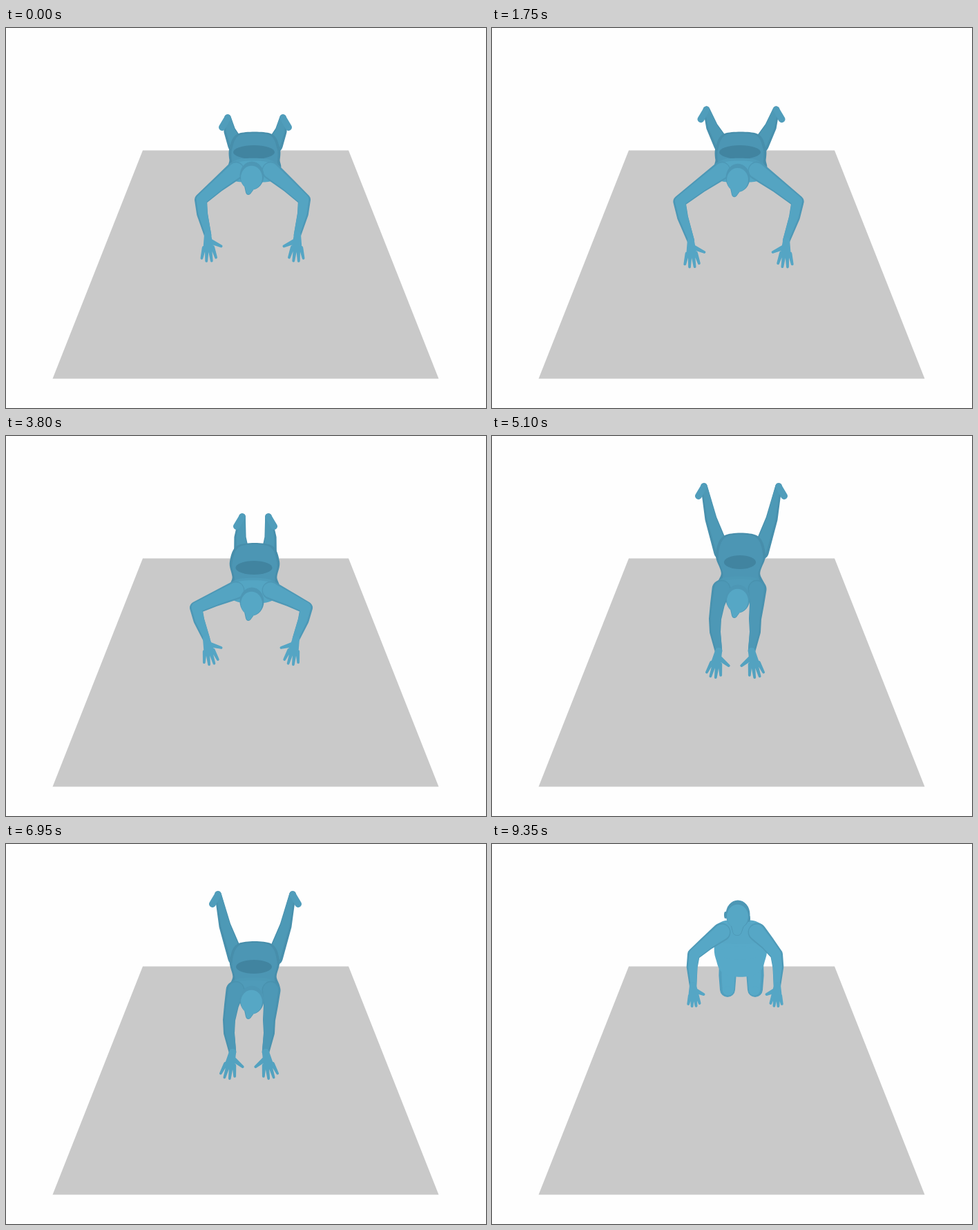
These frames come from a looping animation (695x551 px, 9400 ms). An HTML page:

```html
<!DOCTYPE html>
<html lang="en">
<head>
<meta charset="utf-8">
<title>Floor exercise</title>
<style>
html, body { margin: 0; width: 100%; height: 100%; overflow: hidden; background: #fefefe; }
svg { display: block; width: 100%; height: 100%; }
</style>
</head>
<body>
<svg viewBox="0 0 695 551">
  <path d="M198 177.5H496L626.5 508.5H67.5Z" fill="#c9c9c9"/>
  <g id="body"></g>
</svg>
<script>
const LOOP = 9400, STEP = 50, CYCLE = 1850, REPS = 5;
const group = document.getElementById('body');

// Each x is a distance from the middle of the body, so a pose holds for both sides.
// turn: hand angle inward; lean: sideways shift of the arms; dim: shade of the arms.
const open = {
  footX: 40, footY: 130, hipY: 153, shoulderY: 207, headY: 214,
  elbowX: 75, elbowY: 249, handX: 65, handY: 300,
  turn: 3, lean: 0, dim: .25, shade: 1
};
const wide = { ...open, footX: 56, footY: 98, headY: 225, elbowX: 98, elbowY: 258, handX: 74, handY: 318 };
const lowering = {
  ...open, footX: 19, footY: 117, hipY: 158, shoulderY: 224, headY: 240,
  elbowX: 80, handY: 294, turn: 12, lean: -2
};
const fold = {
  ...open, footX: 15, footY: 152, hipY: 161, shoulderY: 209, headY: 207,
  elbowX: 67, elbowY: 244, handX: 17, handY: 249, turn: 85, lean: 4, dim: .15
};
const tuck = {
  ...fold, footX: 14, footY: 137, hipY: 153, shoulderY: 199, headY: 186,
  elbowX: 53, elbowY: 243, handX: 18, handY: 239, turn: 94, lean: 2
};
const stretch = {
  ...open, footX: 54, footY: 73, hipY: 144, shoulderY: 222, headY: 236,
  elbowX: 29, elbowY: 265, handX: 24, handY: 312, turn: -12, lean: -5, dim: .8
};
const kneel = {
  ...open, footX: 20, footY: 211, hipY: 188, shoulderY: 128, headY: 102,
  elbowX: 60, elbowY: 160, handX: 61, handY: 205, lean: -5, dim: .1, shade: 0
};
const rise = { ...kneel, elbowX: 85, elbowY: 195, handX: 70, handY: 240, shade: .4 };

function raise(p, up) {
  const q = { ...p };
  for (const k of ['shoulderY', 'headY', 'elbowY', 'handY']) q[k] -= up;
  return q;
}

// The same push-up repeats; the last one ends kneeling.
const keys = [];
for (let n = 0; n < REPS; n++) {
  const t = n * CYCLE;
  keys.push([t, open], [t + 100, lowering], [t + 650, fold], [t + 1050, tuck],
    [t + 1400, raise(stretch, 10 * (n - 2))], [t + 1640, wide]);
}
keys.splice(keys.findIndex(k => k[0] > 8500), Infinity, [8850, rise], [9350, kneel]);

const lerp = (a, b, k) => a + (b - a) * k;
const slope = (a, b, f) => (b[1][f] - a[1][f]) / (b[0] - a[0]);

// Monotone tangent: flow through keys without overshoot.
function tangent(i, f) {
  if (!i || i === keys.length - 1) return 0;
  const a = slope(keys[i - 1], keys[i], f), b = slope(keys[i], keys[i + 1], f);
  return a * b > 0 ? 2 * a * b / (a + b) : 0;
}

function poseAt(t) {
  let i = 0;
  while (i < keys.length - 2 && t >= keys[i + 1][0]) i++;
  const [t0, p] = keys[i], [t1, q] = keys[i + 1], out = {};
  const h = t1 - t0, u = Math.min(1, (t - t0) / h), v = 1 - u;
  for (const f in p) {
    out[f] = p[f] * (1 + 2 * u) * v * v + q[f] * u * u * (3 - 2 * u) +
      h * u * v * (tangent(i, f) * v - tangent(i + 1, f) * u);
  }
  return out;
}

const LIGHT = [87, 169, 200], DARK = [64, 130, 158];
const tone = k => `rgb(${LIGHT.map((c, i) => Math.round(lerp(c, DARK[i], k)))})`;
const num = n => n.toFixed(2);

const pool = [];
let used = 0;
function draw(d, fill) {
  if (!pool[used]) {
    pool[used] = document.createElementNS('http://www.w3.org/2000/svg', 'path');
    group.append(pool[used]);
  }
  pool[used].setAttribute('d', d);
  pool[used++].setAttribute('fill', fill);
}

function oval(x, y, rx, ry) {
  const arc = `A${num(rx)} ${num(ry)} 0 1 1 `;
  return `M${num(x - rx)} ${num(y)}${arc}${num(x + rx)} ${num(y)}${arc}${num(x - rx)} ${num(y)}Z`;
}

// Outline around two circles, used for every limb segment.
function bone([x, y], r, [x2, y2], r2) {
  const d = Math.hypot(x2 - x, y2 - y);
  if (d <= Math.abs(r - r2) + .01) return r > r2 ? oval(x, y, r, r) : oval(x2, y2, r2, r2);
  const a = Math.atan2(y2 - y, x2 - x), o = Math.acos((r - r2) / d);
  const at = (cx, cy, cr, w) => `${num(cx + cr * Math.cos(w))} ${num(cy + cr * Math.sin(w))}`;
  const big = o < Math.PI / 2 ? 1 : 0;
  return `M${at(x, y, r, a + o)}A${num(r)} ${num(r)} 0 ${big} 1 ${at(x, y, r, a - o)}` +
    `L${at(x2, y2, r2, a - o)}A${num(r2)} ${num(r2)} 0 ${1 - big} 1 ${at(x2, y2, r2, a + o)}Z`;
}

const chain = (pts, radii, k = 1) =>
  pts.slice(1).map((p, i) => bone(pts[i], radii[i] * k, p, radii[i + 1] * k)).join('');

// Closed curve, mirrored about x, through [half width, y] points.
function mirrored(x, half) {
  const pts = [...half.map(([w, y]) => [x - w, y]), ...half.map(([w, y]) => [x + w, y]).reverse()];
  const n = pts.length, at = i => pts[(i + n) % n];
  let d = `M${pts[0].map(num)}`;
  for (let i = 0; i < n; i++) {
    const [a, b, c, e] = [at(i - 1), at(i), at(i + 1), at(i + 2)];
    const c1 = b.map((v, k) => num(v + (c[k] - a[k]) / 6));
    const c2 = c.map((v, k) => num(v - (e[k] - b[k]) / 6));
    d += `C${c1} ${c2} ${c.map(num)}`;
  }
  return d + 'Z';
}

function hand(wrist, degrees, len, side) {
  const to = (turn, k) => {
    const a = (degrees * Math.PI / 180 + turn) * side;
    return [wrist[0] + Math.sin(a) * len * k, wrist[1] + Math.cos(a) * len * k];
  };
  let d = bone(wrist, 5, to(0, .4), 7);
  for (let i = -1.5; i < 2; i++) {
    d += bone(to(i * .22, .5), 2.9, to(i * .2, .99 - .04 * i * i), 1.9);
  }
  return d + bone(to(.3, .25), 3.8, to(.82, .66), 1.9);
}

function leg(p, side) {
  const at = (x, y) => [361 - side * x, y];
  const knee = 1 - p.shade;
  const hip = Math.min(p.footX, 28), hipY = lerp(p.hipY, p.shoulderY, .3);
  const joints = [
    at(p.footX, p.footY),
    at((p.footX + hip) / 2 + 3 * p.shade, (p.footY + hipY) / 2),
    at(hip, hipY)
  ];
  const radii = [4.8 + 6.2 * knee, 8.6 + 4 * knee, 12];
  draw(chain(joints, radii), tone(.25 + .4 * p.shade));
  draw(chain(joints.map(([x, y]) => [x + side, y]), radii, .76), tone(.42 * p.shade));
  const heel = at(p.footX + 8 * p.shade, p.footY + 14 * p.shade);
  draw(bone(heel, 5, joints[0], 4.6), tone(.3 * p.shade));
}

function torso(p, bend) {
  const down = k => lerp(p.hipY, p.shoulderY, k);
  const waist = 38 - .35 * Math.max(0, p.shoulderY - p.hipY - 50);
  const rows = [[23, down(0)], [36, down(.36)], [waist, down(.7)], [32, down(1)]];
  draw(mirrored(360, rows), tone(.7 * p.shade));
  draw(mirrored(360, rows.map(([w, y]) => [w * .9, y + 2])), tone(.48 * p.shade));
  draw(oval(359, down(.5), waist * .82, 10), tone(.95 * p.shade));

  const y = p.shoulderY;
  const chest = [[20, y - 17], [36, y - 6], [34, y + 6], [20, y + 12 + 14 * bend]];
  draw(mirrored(358, chest), tone(.3 * p.shade + .15 * p.dim));
  draw(mirrored(358, chest.map(([w, v]) => [w * .95, v + 4 - bend * 3])), tone(.45 * p.dim));
}

function arm(p, side, bend) {
  const at = (x, y, lean = p.lean) => [357 + lean - side * x, y];
  const shoulder = at(26, p.shoulderY, 1), elbow = at(p.elbowX, p.elbowY), wrist = at(p.handX, p.handY);
  const between = (a, b, k, out) => [lerp(a[0], b[0], k) - side * out, lerp(a[1], b[1], k)];
  const joints = [
    shoulder, between(shoulder, elbow, .5, 1 + bend), elbow,
    between(elbow, wrist, .4, 2 - 2 * bend), wrist
  ];
  const radii = [13.5, 10.5 + 2 * bend, 9, 8, 5.2];
  draw(chain(joints, radii), tone(.35 + .3 * p.dim));
  draw(chain(joints.map(([x, y]) => [x + side, y - .5]), radii, .82), tone(.55 * p.dim));
  const len = lerp(31, 39, p.shade) * (1 - .15 * bend);
  draw(hand(wrist, p.turn, len, side), tone(.06 + .15 * p.dim));
}

function head(p) {
  const x = 356, y = p.headY, chin = [x - 4 * p.shade - 1, y + 24], jaw = 7 - 3 * p.shade;
  const ear = 1 - p.shade;
  if (ear > .1) draw(oval(x - 18, y + 1, 2 * ear, 5) + oval(x + 16, y + 6, 2 * ear, 5), tone(.5));
  draw(oval(x, y, 17.5, 20.5) + bone([x, y], 14, chin, jaw), tone(.45));
  draw(oval(x - .5, y + 3, 15.5, 17.3) + bone([x, y + 3], 12, chin, jaw - .8), tone(.06));
}

function render(t) {
  used = 0;
  const p = poseAt(t), bend = Math.max(0, p.turn / 90);
  for (const side of [1, -1]) leg(p, side);
  torso(p, bend);
  for (const side of [1, -1]) arm(p, side, bend);
  head(p);
}

const start = performance.now();
function tick() {
  const t = (performance.now() - start) % LOOP;
  render(Math.floor(t / STEP) * STEP);
  requestAnimationFrame(tick);
}
tick();
</script>
</body>
</html>
```
